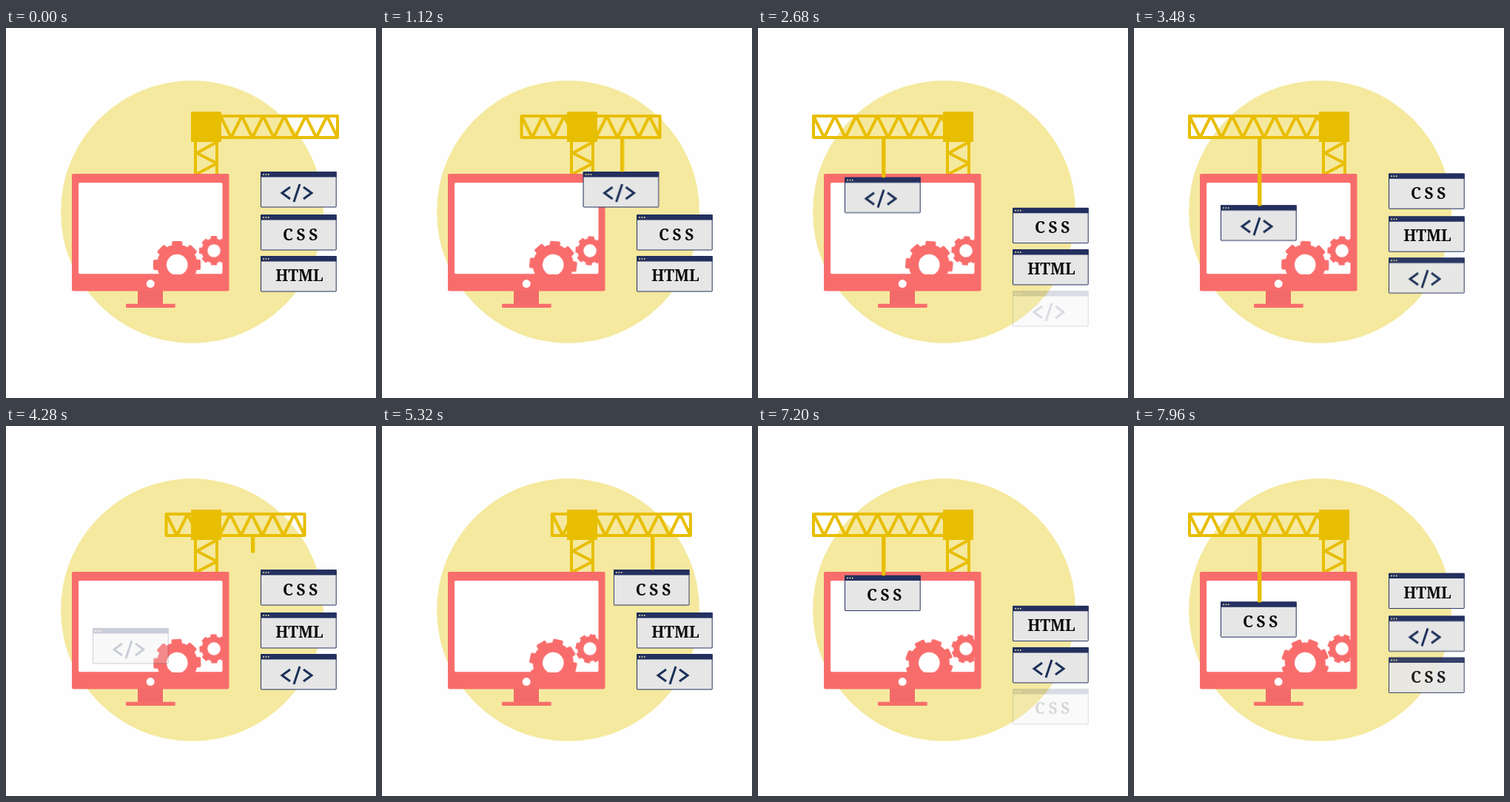
Recreate the animation shown at these times as an HTML page without scripts. Size 500x500 px, loop 8 s.

```html
<!DOCTYPE html>
<html lang="en">
<head>
<meta charset="utf-8">
<title>Website under construction</title>
<style>
html, body { margin: 0; width: 100%; height: 100%; overflow: hidden; background: #fefefe; }
svg { display: block; width: 100%; height: 100%; }
text { font: 700 21px "Noto Serif", "Liberation Serif", serif; text-anchor: middle; fill: #0a0a0a; }
.css { letter-spacing: 4.5px; }

/* everything shares one 8 s timeline */
.crane, .arm, .rope, .card { animation: 8s linear infinite; }
.crane { animation-name: tint; }
.arm { animation-name: arm; }
.rope { animation-name: rope; }
.code-a { animation-name: code-a; }
.css-a { animation-name: css-a; }
.html-a { animation-name: html-a; }
.code-b { animation-name: code-b; }
.css-b { animation-name: css-b; }
.gear { animation: spin 8s linear infinite; }

@keyframes spin { to { transform: rotate(-928deg); } }
@keyframes tint {
  0%, 75.99% { color: #e8be00; }
  76%, 77.49% { color: #eecd45; }
  77.5%, 100% { color: #e8be00; }
}
@keyframes arm {
  0%, 7% { transform: translate(0, 0); }
  25%, 44% { transform: translate(-186px, 0); }
  56.5%, 63.5% { transform: translate(0, 0); }
  81.5%, 100% { transform: translate(-186px, 0); }
}
@keyframes rope {
  0% { transform: translate(-12px, 0); }
  6.5%, 7% { transform: translate(0, 45px); }
  25% { transform: translate(-186px, 45px); }
  31.5% { transform: translate(-227px, 45px); }
  44% { transform: translate(-227px, 93px); }
  56.5% { transform: translate(-12px, 0); }
  63%, 63.5% { transform: translate(0, 45px); }
  81.5% { transform: translate(-186px, 45px); }
  88% { transform: translate(-227px, 45px); }
  100% { transform: translate(-227px, 91px); }
}
/* lifted, carried, lowered, faded out */
@keyframes code-a {
  0%, 7% { transform: translate(0, 0); }
  25% { transform: translate(-186px, 0); }
  31.5% { transform: translate(-227px, 0); }
  44% { transform: translate(-227px, 47px); opacity: 1; }
  56.5%, 100% { transform: translate(-227px, 89px); opacity: 0; }
}
@keyframes css-a {
  0%, 31.5% { transform: translate(0, 58px); }
  44%, 63.5% { transform: translate(0, 0); }
  81.5% { transform: translate(-186px, 0); }
  88% { transform: translate(-227px, 0); }
  100% { transform: translate(-227px, 45px); }
}
/* queue moving up */
@keyframes html-a {
  0%, 31.5% { transform: translate(0, 114px); }
  44%, 88% { transform: translate(0, 58px); }
  100% { transform: translate(0, 2.3px); }
}
@keyframes code-b {
  0%, 31.5% { transform: translate(0, 170px); opacity: 0; }
  44%, 88% { transform: translate(0, 114px); opacity: 1; }
  100% { transform: translate(0, 60.2px); opacity: 1; }
}
@keyframes css-b {
  0%, 88% { transform: translate(0, 170px); opacity: 0; }
  100% { transform: translate(0, 116.2px); opacity: .96; }
}
</style>
</head>
<body>
<svg viewBox="0 0 500 500">
  <defs>
    <clipPath id="screen"><rect x="98" y="209" width="194.5" height="123.5"/></clipPath>
    <clipPath id="below-arm"><rect y="148" width="500" height="200"/></clipPath>
    <g id="tooth"><rect x="-7" y="-32" width="14" height="64" rx="2"/></g>
    <g id="gear" fill="#f86d6c">
      <circle r="27.5"/>
      <use href="#tooth"/>
      <use href="#tooth" transform="rotate(45)"/>
      <use href="#tooth" transform="rotate(90)"/>
      <use href="#tooth" transform="rotate(135)"/>
      <circle r="14.3" fill="#fff"/>
    </g>
    <g id="window">
      <rect x=".5" y=".5" width="101.7" height="47.5" rx=".5" fill="#e6e6e6" stroke="#23305f"/>
      <rect width="102.7" height="7.5" rx=".5" fill="#23305f"/>
      <g fill="#ead9a0">
        <circle cx="4" cy="4" r="1"/><circle cx="7.4" cy="4" r="1"/><circle cx="10.8" cy="4" r="1"/>
      </g>
    </g>
    <g id="code">
      <use href="#window"/>
      <path d="M40 21 29 29l11 8M53 17 45 41M58 21l11 8-11 8" fill="none" stroke="#1c3158" stroke-width="3"/>
    </g>
    <g id="css">
      <use href="#window"/>
      <text class="css" x="56" y="34.5">CSS</text>
    </g>
    <g id="html">
      <use href="#window"/>
      <text x="52.5" y="34">HTML</text>
    </g>
  </defs>

  <circle cx="251.5" cy="248.5" r="177.5" fill="#f5e99f"/>

  <g class="crane" color="#e8be00" fill="none" stroke="currentColor" stroke-width="4" stroke-linejoin="round">
    <path d="M256 152v48M285 152v48M285 154l-27 15 27 14-27 14"/>
    <g class="arm">
      <rect x="261" y="119" width="187" height="29"/>
      <path d="M261 119l14.4 29 14.4-29 14.4 29 14.4-29 14.4 29 14.4-29 14.4 29 14.4-29 14.4 29 14.4-29 14.4 29 14.4-29 14.2 29"/>
    </g>
    <rect x="250" y="113" width="41" height="41" fill="currentColor" stroke="none"/>
  </g>

  <g fill="#f86d6c">
    <rect x="178" y="355" width="34" height="18" fill="#f26a69"/>
    <rect x="162" y="372.7" width="66.7" height="5.3" rx="1"/>
    <rect x="89" y="197" width="212.5" height="158.5" rx="2"/>
    <rect x="98" y="209" width="194.5" height="123.3" rx="2" fill="#fff"/>
    <circle cx="195.2" cy="345.6" r="5.5" fill="#fff"/>
  </g>
  <g clip-path="url(#screen)">
    <g transform="translate(231.3 320)"><g class="gear"><use href="#gear"/></g></g>
    <g transform="translate(281 301) scale(.61)"><g class="gear"><use href="#gear"/></g></g>
  </g>

  <g transform="translate(344 194)">
    <g class="card css-b"><use href="#css"/></g>
    <g class="card code-b"><use href="#code"/></g>
    <g class="card html-a"><use href="#html"/></g>
    <g class="card css-a"><use href="#css"/></g>
    <g class="card code-a"><use href="#code"/></g>
  </g>

  <g class="crane" color="#e8be00" clip-path="url(#below-arm)">
    <rect class="rope" x="394" y="49" width="5.4" height="100.5" rx="2.5" fill="currentColor"/>
  </g>
</svg>
</body>
</html>
```
